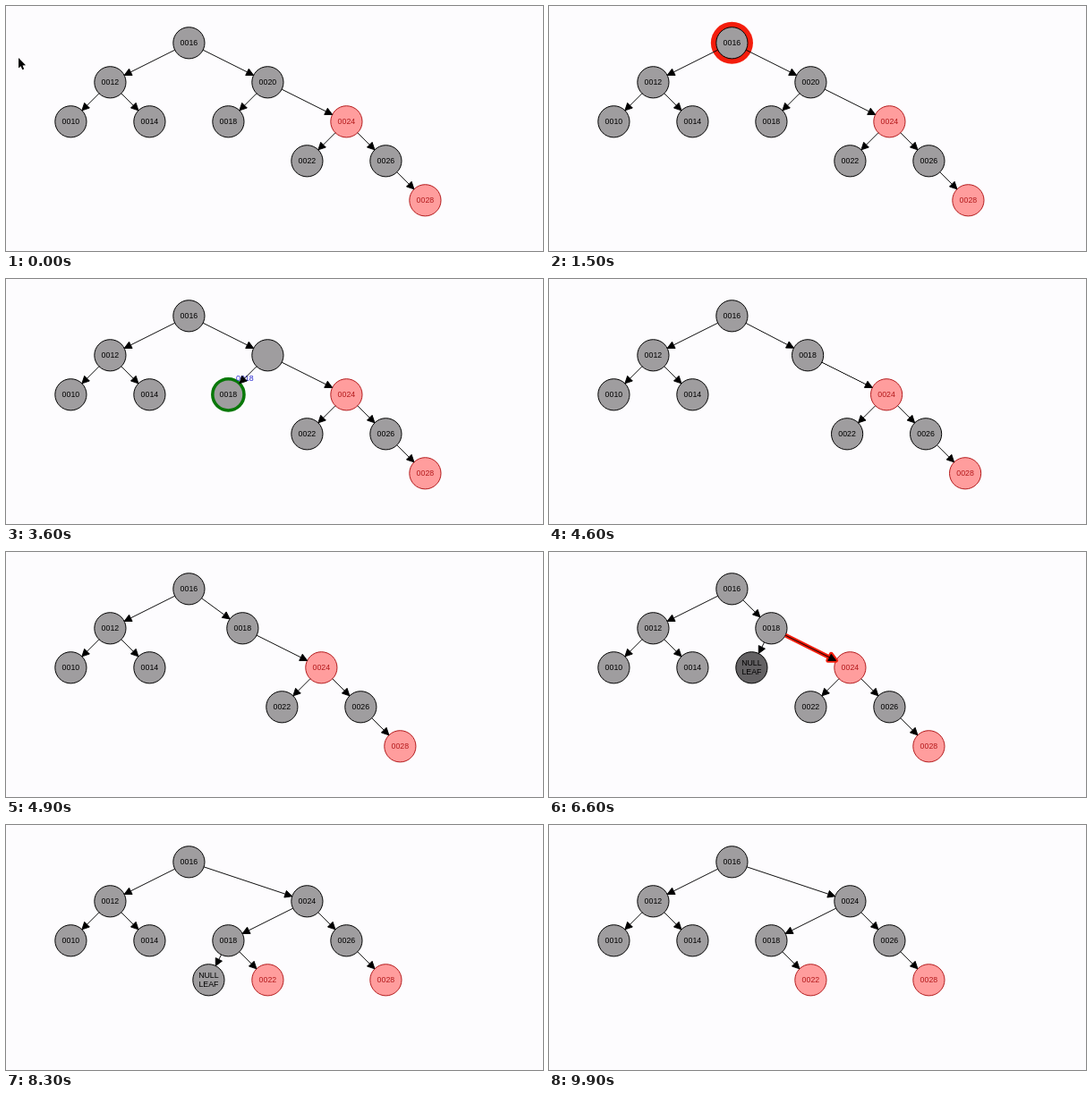
An HTML page with a canvas for the animation above (10 s loop, 600 by 274 pixels).

```html
<!DOCTYPE html>
<html>
<head>
<meta charset="utf-8">
<title>Red-black tree deletion</title>
<style>
  html, body { margin: 0; width: 100%; height: 100%; overflow: hidden; background: #fdfcfe; }
  canvas { display: block; width: 600px; height: 274px; }
</style>
</head>
<body>
<canvas id="stage"></canvas>
<script>
const LOOP = 10000, TICK = 100, RADIUS = 17.6, ROW = 44;
const GREY = '#9f9d9f', PINK = '#ff9d9d', DARK = '#636163';
const BLACK = '#000', CRIMSON = '#b41a1c', RED = '#f41d0c', GREEN = '#087808', BLUE = '#2a2ad0';

const canvas = document.getElementById('stage');
const ctx = canvas.getContext('2d');
const ratio = window.devicePixelRatio || 1;
canvas.width = 600 * ratio;
canvas.height = 274 * ratio;

const ramp = (t, from, to) => Math.min(1, Math.max(0, (t - from) / (to - from)));
const during = (t, from, to) => t >= from && t < to;
const mix = (a, b, k) => ({ x: a.x + (b.x - a.x) * k, y: a.y + (b.y - a.y) * k });

// Highlight margin swells and shrinks as a triangle wave.
function pulse(t) {
  const phase = ((t - 2300) / 1710 % 1 + 1) % 1;
  return 0.88 * (3 + 4 * (1 - Math.abs(2 * phase - 1)));
}

function circle(p, radius) {
  ctx.beginPath();
  ctx.arc(p.x, p.y, radius, 0, 2 * Math.PI);
}

function text(label, p, color) {
  ctx.fillStyle = color;
  const lines = label.split('\n');
  lines.forEach((line, i) =>
    ctx.fillText(line, p.x, p.y + 0.6 + (i - (lines.length - 1) / 2) * 10.2));
}

function drawNode(node, glow) {
  if (glow) {
    circle(node, RADIUS + glow);
    ctx.fillStyle = RED;
    ctx.fill();
  }
  const ink = node.fill === PINK ? CRIMSON : BLACK;
  circle(node, RADIUS);
  ctx.fillStyle = node.fill;
  ctx.fill();
  ctx.strokeStyle = ink;
  ctx.lineWidth = 1;
  ctx.stroke();
  text(node.label, node, ink);
}

function drawRing(p) {
  circle(p, RADIUS);
  ctx.strokeStyle = GREEN;
  ctx.lineWidth = 3.5;
  ctx.stroke();
}

function drawArrow(from, to, color, width) {
  const length = Math.hypot(to.x - from.x, to.y - from.y);
  if (length < 2 * RADIUS) return;
  const ux = (to.x - from.x) / length, uy = (to.y - from.y) / length;
  const tip = { x: to.x - ux * RADIUS, y: to.y - uy * RADIUS };
  const base = { x: tip.x - ux * 8, y: tip.y - uy * 8 };
  ctx.strokeStyle = ctx.fillStyle = color;
  ctx.lineWidth = width;
  ctx.lineJoin = width > 2 ? 'round' : 'miter';
  ctx.beginPath();
  ctx.moveTo(from.x + ux * RADIUS, from.y + uy * RADIUS);
  ctx.lineTo(base.x, base.y);
  ctx.stroke();
  ctx.beginPath();
  ctx.moveTo(tip.x, tip.y);
  ctx.lineTo(base.x - uy * 4, base.y + ux * 4);
  ctx.lineTo(base.x + uy * 4, base.y - ux * 4);
  ctx.closePath();
  ctx.fill();
  ctx.stroke();
}

function drawCursor() {
  ctx.beginPath();
  [[14, 58], [14, 69.5], [16.6, 67.2], [18.3, 71.2], [20.2, 70.4], [18.5, 66.5], [22, 66.3]]
    .forEach(([x, y]) => ctx.lineTo(x, y));
  ctx.closePath();
  ctx.lineJoin = 'round';
  ctx.lineWidth = 1.4;
  ctx.strokeStyle = '#fff';
  ctx.stroke();
  ctx.fillStyle = BLACK;
  ctx.fill();
}

// Node positions, colours and labels at time t.
function layout(t) {
  const open = ramp(t, 5578, 6189);
  const shift = -66 * ramp(t, 4560, 5360) + 22 * open;
  const lift = ROW * ramp(t, 6800, 7410);
  const node = (label, x, y, fill = GREY) => ({ label, x, y, fill });
  const pivotLabel = t < 3345 ? '0020' : t < 3955 ? '' : '0018';
  const nodes = {
    root: node('0016', 204, 41),
    n12: node('0012', 116, 85),
    n10: node('0010', 72, 129),
    n14: node('0014', 160, 129),
    pivot: node(pivotLabel, 292 + shift, 85 + lift, during(t, 7410, 8021) ? PINK : GREY),
    n24: node('0024', 380 + shift, 129 - lift, t < 7410 ? PINK : GREY),
    n22: node('0022', 336 + shift, 173, t < 8021 ? GREY : PINK),
    n26: node('0026', 424 + shift, 173 - lift),
    n28: node('0028', 468 + shift, 217 - lift, PINK)
  };
  if (t < 3955) nodes.leaf = node('0018', 248, 129);
  else if (during(t, 5578, 8600))
    nodes.leaf = node('NULL\nLEAF', 226, 85 + ROW * open + lift, t < 8021 ? DARK : GREY);
  return nodes;
}

function draw(t) {
  ctx.setTransform(ratio, 0, 0, ratio, 0, 0);
  ctx.fillStyle = '#fdfcfe';
  ctx.fillRect(0, 0, 600, 274);
  if (t < 100) drawCursor();

  ctx.translate(0.4, 0.3);
  ctx.font = '8.8px "Liberation Sans", Arial, sans-serif';
  ctx.textAlign = 'center';
  ctx.textBaseline = 'middle';

  const n = layout(t);
  const glowing = during(t, 900, 1511) ? n.root : during(t, 2122, 2733) ? n.pivot : null;
  for (const node of Object.values(n)) if (node !== glowing) drawNode(node);
  if (glowing) drawNode(glowing, pulse(t));

  if (during(t, 1511, 2122)) drawRing(mix(n.root, n.pivot, ramp(t, 1511, 2122)));
  if (during(t, 2733, 3955)) drawRing(mix(n.pivot, n.leaf, ramp(t, 2733, 3344)));
  if (during(t, 3345, 3955)) text('0018', mix(n.leaf, n.pivot, ramp(t, 3345, 3955)), BLUE);

  const rotated = t >= 6800;
  const edges = [
    [n.root, n.n12], [n.n12, n.n10], [n.n12, n.n14],
    [n.root, rotated ? n.n24 : n.pivot],
    rotated ? [n.n24, n.pivot] : [n.pivot, n.n24],
    [rotated ? n.pivot : n.n24, n.n22],
    [n.n24, n.n26], [n.n26, n.n28]
  ];
  if (n.leaf) edges.push([n.pivot, n.leaf]);
  if (during(t, 6189, 6800)) drawArrow(n.pivot, n.n24, RED, pulse(t) * 0.8);
  for (const [from, to] of edges) drawArrow(from, to, BLACK, 0.95);
}

const start = performance.now();
function frame() {
  const t = (performance.now() - start) % LOOP;
  draw(Math.floor(t / TICK) * TICK);
  requestAnimationFrame(frame);
}
frame();
</script>
</body>
</html>
```
